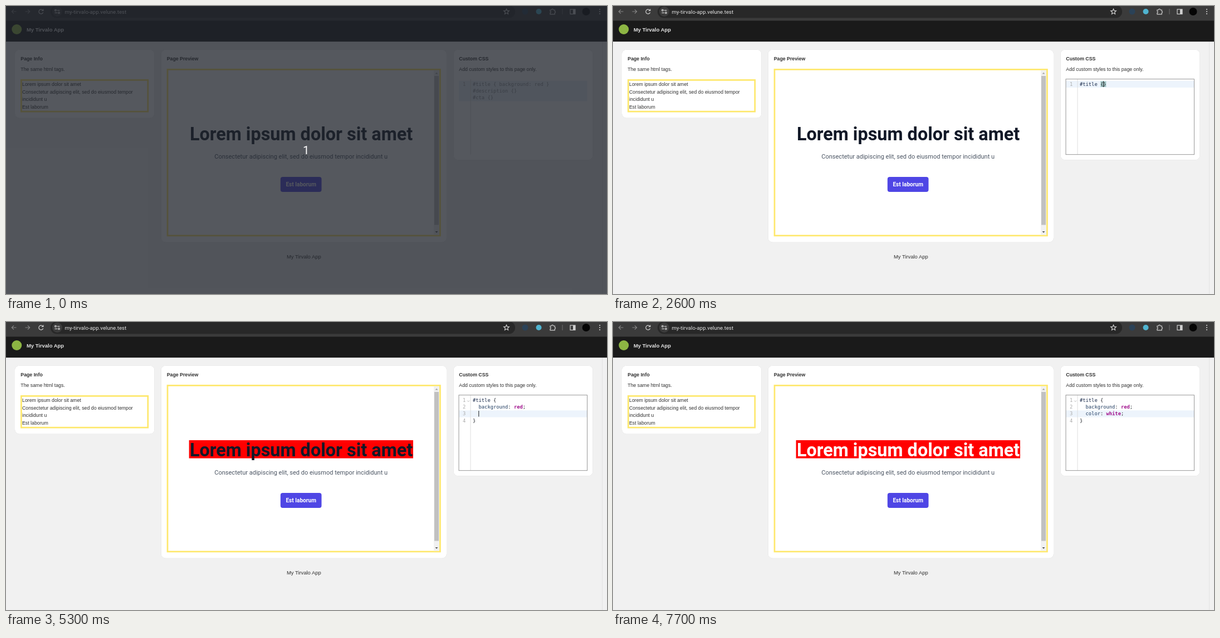
Animation, 1079 px wide and 519 px high, one loop 8 s. Source, as an HTML page:

```html
<!DOCTYPE html>
<html lang="en">
<head>
<meta charset="utf-8">
<title>Custom CSS editor</title>
<style>
html, body { margin: 0; width: 100%; height: 100%; overflow: hidden; background: #f1f1f1; }
svg { display: block; }
#stage { width: 100%; height: 100%; }
text { font: 8.77px "Liberation Sans", Arial, sans-serif; fill: #303030; white-space: pre; }
.b { font-weight: bold; }
.ui { font-family: Roboto, "Open Sans", sans-serif; }
.code, .code text { font: 8.77px "DejaVu Sans Mono", monospace; fill: #24292e; }
.code .num { fill: #aaa; }
.code .hint { fill: #8a8f94; }
.code .sel { fill: #1b2b4b; }
.code .prop { fill: #1e3a5f; }
.code .part { fill: #4a2fa8; }
.code .val { fill: #a0108c; font-weight: bold; }
.code .lit { fill: #fff; }
.code .icon { font-size: 7.9px; opacity: .65; }
.card { fill: #fff; filter: drop-shadow(0 .7px .5px rgba(0,0,0,.22)); }
.frame { fill: none; stroke: #fee86c; stroke-width: 2.7; }
.line { fill: none; stroke: #d0d0d0; stroke-width: 1.2; }
</style>
</head>
<body>
<svg id="stage" viewBox="0 0 1079 519" preserveAspectRatio="none">
  <rect width="1079" height="519" fill="#f1f1f1"/>
  <path d="M1070.5 64V519" stroke="#e3e3e3"/>

  <!-- browser bar -->
  <rect width="1079" height="27" fill="#3b3b3b"/>
  <rect x="80" y="-1" width="834" height="22.5" rx="11" fill="#282828"/>
  <circle cx="92" cy="10" r="9" fill="#3c3c3c"/>
  <g class="line">
    <path d="M18.5 10H10.5M14 6.3L10.3 10L14 13.7M34.5 10H42.5M39 6.3L42.7 10L39 13.7" stroke="#858585"/>
    <path d="M66.3 8A4 4 0 1 0 66.7 11.5M66.9 5.5V8.5H63.8"/>
    <path d="M92 7.8H96.5M87.5 12.3H92"/>
    <circle cx="89" cy="7.8" r="1.4"/><circle cx="95" cy="12.3" r="1.4"/>
    <path d="M898.5 5.2L899.9 8.4L903.3 8.7L900.7 11L901.5 14.4L898.5 12.6L895.5 14.4L896.3 11L893.7 8.7L897.1 8.4Z"/>
    <path d="M977 7H979.5A1.6 1.6 0 0 1 982.7 7H985.2V9.3A1.6 1.6 0 0 1 985.2 12.4V14.8H977V12.4A1.6 1.6 0 0 0 977 9.3Z"/>
    <path d="M999 5V15" stroke="#666"/>
    <rect x="1013" y="6" width="9" height="8.5"/>
  </g>
  <rect x="1018" y="6" width="4" height="8.5" fill="#d0d0d0"/>
  <circle cx="932" cy="10" r="5.5" fill="#2b4257"/>
  <circle cx="956.5" cy="10" r="5" fill="#4fb4d0"/>
  <circle cx="1041.5" cy="10" r="7" fill="#050505"/>
  <g fill="#d0d0d0"><circle cx="1066" cy="6" r="1.1"/><circle cx="1066" cy="10" r="1.1"/><circle cx="1066" cy="14" r="1.1"/></g>
  <text class="ui" x="105.5" y="13.6" style="font-size:9.7px;fill:#e3e3e3">my-tirvalo-app.velune.test</text>

  <!-- app header -->
  <rect y="26.5" width="1079" height="37.7" fill="#1a1a1a"/>
  <circle cx="19.3" cy="42" r="9" fill="#8db543"/>
  <text class="b" x="37" y="46" style="font-size:9.44px;fill:#e3e3e3">My Tirvalo App</text>

  <!-- cards -->
  <rect class="card" x="16" y="78.7" width="250.5" height="123" rx="8"/>
  <rect class="card" x="278.5" y="78.7" width="512.5" height="347" rx="8"/>
  <rect class="card" x="803.5" y="78.7" width="250" height="198.6" rx="8"/>

  <text class="b" x="26.3" y="98">Page Info</text>
  <text x="26.3" y="117.2">The same html tags.</text>
  <rect class="frame" x="27.4" y="133.4" width="227.4" height="56.8"/>
  <text x="29" y="144.3">Lorem ipsum dolor sit amet</text>
  <text x="29" y="157.8">Consectetur adipiscing elit, sed do eiusmod tempor</text>
  <text x="29" y="171.3">incididunt u</text>
  <text x="29" y="184.8">Est laborum</text>

  <text class="b" x="288.7" y="98">Page Preview</text>
  <rect class="frame" x="290" y="114.4" width="489.4" height="299.4"/>
  <rect x="768" y="115.8" width="10" height="296.6" fill="#f1f1f1"/>
  <rect x="769" y="126" width="8" height="268.5" fill="#c1c1c1"/>
  <path d="M770.5 122.5L773 119.8L775.5 122.5Z" fill="#a3a3a3"/>
  <path d="M770.5 406L773 408.7L775.5 406Z" fill="#505050"/>
  <rect id="mark" x="328.6" y="213" width="402.4" height="32.6" fill="#f00"/>
  <text id="title" class="ui b" x="530" y="241.8" text-anchor="middle" style="font-size:32.4px">Lorem ipsum dolor sit amet</text>
  <text class="ui" x="529.7" y="275.4" text-anchor="middle" style="font-size:11.03px;fill:#4b5563">Consectetur adipiscing elit, sed do eiusmod tempor incididunt u</text>
  <rect x="492.8" y="308" width="73.7" height="27" rx="4" fill="#4f46e5"/>
  <text class="ui b" x="529.7" y="325" text-anchor="middle" style="font-size:10.14px;fill:#fff">Est laborum</text>
  <text x="534.8" y="455.4" text-anchor="middle" style="font-size:9.44px">My Tirvalo App</text>

  <text class="b" x="813.3" y="98">Custom CSS</text>
  <text x="813.3" y="117.2">Add custom styles to this page only.</text>
  <g id="editor" class="code"></g>

  <g id="intro">
    <rect width="1079" height="519" fill="rgb(32,36,44)" fill-opacity=".76"/>
    <text class="ui" x="538.8" y="266.5" text-anchor="middle" style="font-size:20.5px;fill:#fff">1</text>
  </g>
</svg>
<script>
const LOOP = 8000, CH = 5.28, ROW = 12.27, LEFT = 838, TOP = 134.8, ITEM = 12.05;
const HINT = ['#title { background: red }', '#description {}', '#cta {}'];
const $ = id => document.getElementById(id);

// Keystrokes: [time, text]
const keys = [[1500, '#'], [1800, 't'], [2000, 'i'], [2200, 't'], [2300, 'le'], [2400, ' '], [2600, '{'], [2800, '\n']];
const type = (start, word) => [...word].forEach((c, i) => keys.push([start + i * 100, c]));
type(3100, 'backgr');
type(3800, 'ound');
type(4300, ': red');
type(5000, ';');
type(5300, '\n');
keys.push([5600, 'c']);
type(5800, 'olor');
type(6300, ': white');
type(7100, ';');

// Completion popups: [open, close, line, column, words]
const join = (stem, ends) => ends.split(' ').map(e => stem + e);
const props = [
  'backdrop-filter', 'backface-visibility', 'background',
  ...join('background-', 'attachment blend-mode clip color image origin position position-x position-y repeat repeat-x repeat-y size'),
  'baseline-shift', 'block-size', 'border', ...join('border-', 'block border-collapse bottom image left radius right spacing style top width'),
  'bottom', 'box-shadow', 'box-sizing', 'break-after', 'break-before', 'break-inside',
  'caption-side', 'clear', 'clip', 'clip-path', 'clip-rule', 'color',
  ...join('color-', 'interpolation interpolation-filters rendering scheme'),
  ...join('column-', 'count fill gap rule span width'), 'columns', 'contain',
  ...join('contain-intrinsic-', 'block-size height inline-size size width'), 'content', 'cursor',
  ...'stop caret flood accent border outline lighting border-top border-left column-rule border-right border-block border-bottom border-inline text-emphasis text-decoration'.split(' ').map(s => s + '-color')
];
const values = ('radial-gradient radio read-only read-write read-write-plaintext-only rebeccapurple rectangle red region relative repeat repeat-x repeat-y reset reverse ' +
  'rgb ridge right rotate round row row-resize rtl run-in darkred indianred orangered mediumvioletred palevioletred ' +
  'w-resize wait wave wavy wheat white whitesmoke wider window windowframe windowtext words wrap wrap-reverse ' +
  'ghostwhite floralwhite navajowhite antiquewhite').split(' ');
const popups = [[3200, 4400, 1, 2, props], [4600, 5100, 1, 14, values], [5700, 6400, 2, 2, props], [6600, 7200, 2, 9, values]];

function matches(word, words) {
  const head = words.filter(w => w.startsWith(word)).sort();
  const tail = word.length < 3 ? [] : words.filter(w => w.indexOf(word) > 0);
  return head.concat(tail.sort((a, b) => a.length - b.length || (a < b ? -1 : 1)));
}

const rect = (x, y, w, h, fill, more = '') => `<rect x="${x}" y="${y}" width="${w}" height="${h}" fill="${fill}" ${more}/>`;
const text = (x, y, body, cls = '', more = '') => `<text x="${x}" y="${y}" class="${cls}" ${more}>${body}</text>`;
const span = (cls, body) => `<tspan class="${cls}">${body}</tspan>`;
const baseline = i => TOP + i * ROW + 9.1;

function colour(line) {
  const rule = line.match(/^  ([a-z]+)(: ?)([a-z]*)(;?)$/);
  if (rule) return '  ' + span('prop', rule[1]) + rule[2] + span('val', rule[3]) + rule[4];
  if (line[0] === '#') return line.replace(/^#[a-z]*/, s => span('sel', s));
  return line.replace(/[a-z]+/, s => span('part', s));
}

function popup([, , line, col, words], typed) {
  const word = typed.match(/([a-z]+)[:;]?$/)[1];
  const list = matches(word, words);
  const w = Math.max(170, 27 + CH * Math.max(...list.map(s => s.length)));
  const h = Math.min(89, list.length * ITEM + 1.3);
  const bar = list.length * ITEM > 88;
  let out = rect(.5, .5, w - 1, h - 1, '#f5f5f5', 'stroke="#bbb" stroke-width=".8"');
  out += rect(.7, .7, w - (bar ? 11 : 1.4), ITEM, '#1177cc');
  list.slice(0, 8).forEach((item, i) => {
    const at = item.indexOf(word), end = at + word.length, y = i * ITEM + 9.6, lit = i ? '' : 'lit';
    out += text(3.2, y, '□', 'icon ' + lit);
    out += text(14, y, item.slice(0, at) + `<tspan text-decoration="underline">${word}</tspan>` + item.slice(end), lit);
  });
  out += rect(0, h - .8, w, .8, '#bbb');
  if (bar) {
    const x = w - 10.3;
    out += rect(x, .7, 9.6, h - 1.5, '#f1f1f1');
    out += rect(x + 1, 10.5, 7.8, Math.max(11, 67 * 7.28 / list.length), '#c1c1c1');
    out += `<path d="M${x + 2.4} 7.2l2.4-2.6l2.4 2.6z" fill="#a3a3a3"/><path d="M${x + 2.4} ${h - 7.2}l2.4 2.6l2.4-2.6z" fill="#404040"/>`;
  }
  const left = Math.min(LEFT + col * CH + .2, 1079.5 - w);
  return `<svg x="${left}" y="${TOP + (line + 1) * ROW - 1.4}" width="${w}" height="${h}">${out}</svg>`;
}

function editor(t) {
  const done = keys.filter(k => k[0] <= t);
  const typed = done.map(k => k[1]).join('');
  const lines = typed.split('\n').map((s, i) => i ? '  ' + s : s);
  const row = lines.length - 1, col = lines[row].length;
  const pair = typed.endsWith('{');
  if (pair) lines[0] += '}';
  else if (row) lines.push('}');

  let out = rect(813.2, TOP + row * ROW, 230, ROW * (typed ? 1 : 3), '#edf4fc');
  out += '<path d="M834 132V267.5" stroke="#ddd"/>';
  if (pair) out += rect(LEFT + (col - 1) * CH, TOP + .6, CH * 2, 10.6, '#328c82', 'fill-opacity=".34"');
  lines.forEach((line, i) => {
    out += text(825.2, baseline(i), i + 1, 'num', 'text-anchor="end"');
    out += text(LEFT, baseline(i), colour(line));
  });
  if (row) out += '<path d="M828.2 141.6l1.9 2l1.9-2" fill="none" stroke="#aaa" stroke-width=".8"/>';
  if (!typed) HINT.forEach((line, i) => out += text(LEFT, baseline(i), line, 'hint'));

  if (t >= 700) {
    out += '<rect x="813" y="131.7" width="230.4" height="136" fill="none" stroke="#8a8a8a" stroke-width=".9"/>';
    const last = done.length ? done[done.length - 1][0] : 700;
    if ((t - last) % 1200 < 600) out += rect(LEFT - .2 + col * CH, TOP + .6, .9, 10.6, '#000', `transform="translate(0 ${row * ROW})"`);
  }
  const open = popups.find(p => t >= p[0] && t < p[1]);
  return out + (open ? popup(open, typed) : '');
}

let shown = -1;
function draw(t) {
  const step = Math.floor(t / 100) * 100;
  if (step === shown) return;
  shown = step;
  $('editor').innerHTML = editor(step);
  $('mark').style.display = step >= 4700 ? '' : 'none';
  $('title').style.fill = step >= 6900 ? '#fff' : '#111827';
  $('intro').style.display = step < 100 ? '' : 'none';
}

const start = performance.now();
function tick() {
  draw((performance.now() - start) % LOOP);
  requestAnimationFrame(tick);
}
tick();
</script>
</body>
</html>
```
